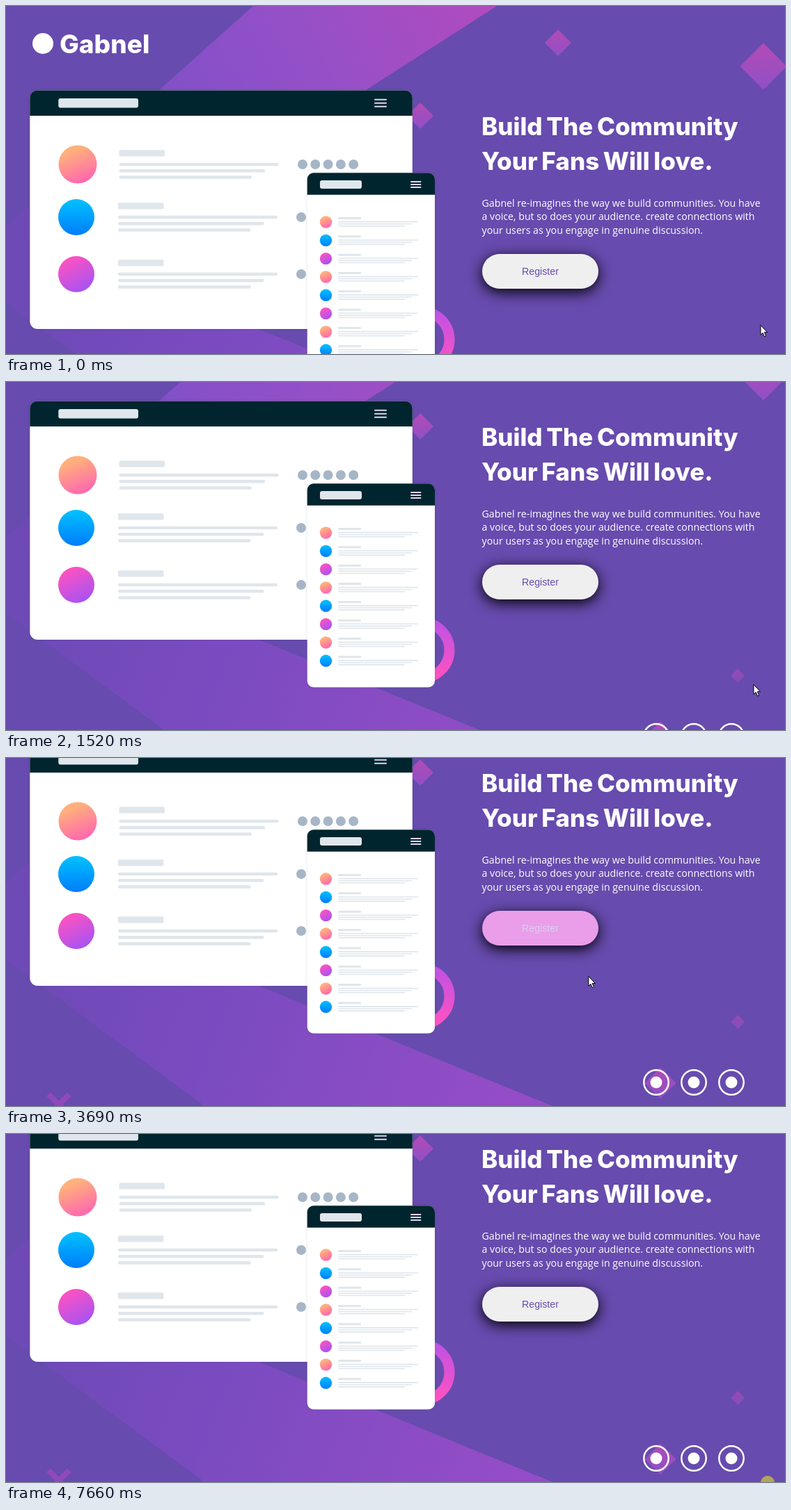
Animation of 1119 by 501 pixels, one loop 7860 ms. Source, as an HTML page:

```html
<!DOCTYPE html>
<html lang="en">
<head>
<meta charset="utf-8">
<title>Gabnel</title>
<style>
html, body { margin: 0; width: 100%; height: 100%; overflow: hidden; background: #674bae; }
svg { display: block; width: 1119px; height: 501px; }
text { fill: #fff; white-space: pre; }
.brand { font: 800 37px Inter, sans-serif; }
.title { font: 800 35px Inter, sans-serif; word-spacing: -2px; }
.copy { font: 14.2px "Open Sans", sans-serif; }
.label { font: 14.2px "Liberation Sans", Arial, sans-serif; text-anchor: middle; }
#shadow { filter: blur(10px); }
.card { filter: drop-shadow(0 0 1.5px rgba(0, 20, 40, .15)); }
#cursor path { fill: #fff; stroke: #000; stroke-linejoin: round; }
</style>
</head>
<body>
<svg viewBox="0 0 1119 501">
  <defs>
    <linearGradient id="upper" gradientUnits="userSpaceOnUse" x1="690" y1="0" x2="70" y2="330">
      <stop stop-color="#b04bbf"/><stop offset=".35" stop-color="#9650c7"/>
      <stop offset=".7" stop-color="#8050c8"/><stop offset="1" stop-color="#6f4ab7"/>
    </linearGradient>
    <linearGradient id="lower" gradientUnits="userSpaceOnUse" x1="30" y1="400" x2="720" y2="638">
      <stop stop-color="#6d4ab6"/><stop offset=".4" stop-color="#7a4bc0"/><stop offset="1" stop-color="#944dc6"/>
    </linearGradient>
    <linearGradient id="gem" x2="0" y2="1"><stop stop-color="#b74bb5"/><stop offset="1" stop-color="#9250c9"/></linearGradient>
    <linearGradient id="ring" x2="0" y2="1"><stop stop-color="#c052e4"/><stop offset="1" stop-color="#ff52c1"/></linearGradient>
    <linearGradient id="peach" x1=".3" x2=".7" y2="1"><stop offset=".15" stop-color="#ffb07c"/><stop offset=".9" stop-color="#ff6cab"/></linearGradient>
    <linearGradient id="sky" x2="0" y2="1"><stop stop-color="#00c2ff"/><stop offset="1" stop-color="#007dfb"/></linearGradient>
    <linearGradient id="pink" x1=".25" x2=".75" y2="1"><stop offset=".05" stop-color="#ff52c1"/><stop offset="1" stop-color="#a253f5"/></linearGradient>
  </defs>
  <g id="page">
    <path fill="url(#upper)" d="M355 0H705L34 432 0 427V318Z"/>
    <path fill="url(#lower)" d="M0 316 785 638H285L0 427Z"/>
    <g id="gems"></g>
    <path d="M61 621 91 651M91 621 61 651" stroke="#9049b9" stroke-width="8"/>
    <circle cx="597" cy="480" r="40" fill="none" stroke="url(#ring)" stroke-width="15"/>
    <g id="art"></g>
    <circle cx="53" cy="54" r="15" fill="#fff"/>
    <text class="brand" x="77" y="67.5">Gabnel</text>
    <text class="title" x="683" y="186">Build The Community</text>
    <text class="title" x="683" y="236">Your Fans Will love.</text>
    <text class="copy" x="683.5" y="289">Gabnel re-imagines the way we build communities. You have</text>
    <text class="copy" x="683.5" y="308.3">a voice, but so does your audience. create connections with</text>
    <text class="copy" x="683.5" y="327.6">your users as you engage in genuine discussion.</text>
    <rect id="shadow" x="684" y="362" width="167" height="50" rx="25"/>
    <rect id="button" x="684" y="357" width="167" height="50" rx="25"/>
    <text id="label" class="label" x="767.5" y="386.5">Register</text>
    <g id="icons"></g>
  </g>
  <circle id="click" r="10" fill="#ff0" opacity=".5"/>
  <g id="cursor">
    <path d="M0-.5V13.5L3.1 10.6 5.5 16 7.7 15 5.3 9.8H9.5Z"/>
    <path d="M-1.8 1.5Q0-.8 1.6 1.5V6.5L6.8 8Q8.6 8.6 8.4 11L7 16V19H-2V17L-6 11.5Q-6.3 9.4-4.4 9.8L-1.8 12Z"/>
  </g>
</svg>
<script>
const $ = id => document.getElementById(id);
const rect = (x, y, w, h, fill, r = 0) =>
  `<rect x="${x}" y="${y}" width="${w}" height="${h}" rx="${r}" fill="${fill}"/>`;
const disc = (x, y, r, fill) => `<circle cx="${x}" cy="${y}" r="${r}" fill="${fill}"/>`;
const gem = (x, y, r, opacity) =>
  `<path d="M${x} ${y - r}l${r} ${r} ${-r} ${r} ${-r} ${-r}Z" fill="url(#gem)" opacity="${opacity}"/>`;
const paints = ['peach', 'sky', 'pink'].map(id => `url(#${id})`);
const pale = '#dfe6ec', slate = '#a6b6c6';

function card(x, y, w, h, head, r) {
  return `<g class="card">${rect(x, y, w, h, '#fff', r)}<path fill="#00252e" d="M${x} ${y + head}V${y + r}` +
    `a${r} ${r} 0 0 1 ${r} ${-r}H${x + w - r}a${r} ${r} 0 0 1 ${r} ${r}V${y + head}Z"/></g>`;
}
function menu(x, y, w, gap) {
  return [-1, 0, 1].map(i => rect(x, y + i * gap - 1, w, 2, '#e2d5ee', 1)).join('');
}
function bigRow(y, r, x, i) {
  const lines = [229, 209.5, 190.5].map((w, k) => rect(x, y - 2.2 + k * 9.2, w, 4.5, pale, 2));
  return disc(i ? 101 : 103, y, r, paints[i]) + rect(x, y - 20.7, 65.5, 9.3, pale, 2) + lines.join('');
}
function smallRow(i) {
  const y = 311 + i * 26.33;
  const lines = [115, 106, 96].map((w, k) => rect(477, y - 1.2 + k * 3.1, w, 1.6, pale, .8));
  return disc(459.5, y, 8.7, paints[i % 3]) + rect(477, y - 7, 33, 3, pale, 1) + lines.join('');
}

$('gems').innerHTML = gem(793, 53, 19, .95) + gem(1088, 87, 33.5, .95) + gem(595, 158, 19, .95) +
  gem(1051, 517, 10, .6) + gem(940, 605, 22.5, .9);

$('art').innerHTML = card(34.3, 121.4, 549.5, 343.6, 36.6, 11) + rect(75.3, 133, 114.7, 13.5, pale, 3) +
  menu(529, 139.7, 18, 5) +
  bigRow(228, 27.5, 162.5, 0) + bigRow(304, 26, 161, 1) + bigRow(386, 26, 161, 2) +
  [0, 1, 2, 3, 4].map(i => disc(426 + i * 18.3, 228, 7, slate)).join('') +
  disc(424, 304, 7, slate) + disc(424, 386, 7, slate) +
  card(432.7, 240.3, 183.3, 293.2, 31.5, 9) + rect(451, 251, 60, 12, pale, 3) + menu(581, 257, 15.5, 4) +
  [...Array(8).keys()].map(smallRow).join('');

$('icons').innerHTML = [934, 988, 1042].map(x =>
  `<g><circle cx="${x}" cy="604" r="17.7" fill="none" stroke="currentColor" stroke-width="2.5"/>` +
  disc(x, 604, 8.5, 'currentColor') + '</g>').join('');

const LOOP = 7860;
// [start time, scroll offset], held until the next
const scrolls = [[0, 0], [910, 8], [980, 25], [1050, 33], [1450, 55], [1520, 94], [1590, 126], [1660, 137]];
// [start, end, x, y] of each pointer move
const moves = [
  [70, 70, 1074, 436], [2300, 2740, 804, 262], [3460, 4170, 936, 474],
  [4600, 5060, 990, 475], [5600, 6110, 1042, 472], [6960, 7330, 1062, 506]
];
// [enter, leave] while the pointer is over the button and each icon
const hovers = [[2650, 3600], [4040, 4780], [4890, 5800], [5940, 7080]];

const clamp = x => Math.min(1, Math.max(0, x));
const smooth = x => x * x * (3 - 2 * x);
const bezier = (a, b, s) => 3 * a * s * (1 - s) ** 2 + 3 * b * s * s * (1 - s) + s ** 3;

// CSS "ease" timing
function ease(x) {
  let lo = 0, hi = 1;
  for (let i = 0; i < 16; i++) {
    const mid = (lo + hi) / 2;
    if (bezier(.25, .25, mid) < x) lo = mid; else hi = mid;
  }
  return bezier(.1, 1, lo);
}
const fade = (t, [enter, leave]) => ease(clamp((t - enter) / 500)) - ease(clamp((t - leave) / 500));
const mix = (a, b, p) => `rgb(${a.map((v, i) => Math.round(v + (b[i] - v) * p))})`;
const white = [255, 255, 255], rose = [232, 130, 232];

function pointer(t) {
  let x = 1084, y = 460;
  for (const [start, end, toX, toY] of moves) {
    if (t < start) break;
    const p = end > start ? smooth(clamp((t - start) / (end - start))) : 1;
    x += (toX - x) * p;
    y += (toY - y) * p;
  }
  return [x, y];
}

function draw(t) {
  const scroll = scrolls.filter(s => s[0] <= t).pop()[1];
  $('page').setAttribute('transform', `translate(0 ${-scroll})`);

  const [onButton, ...onIcons] = hovers.map(h => fade(t, h));
  $('button').style.fill = mix([239, 239, 239], rose, onButton);
  $('label').style.fill = mix([103, 75, 174], white, onButton);
  onIcons.forEach((p, i) => $('icons').children[i].style.color = mix(white, rose, p));

  const [x, y] = pointer(t);
  const [arrow, hand] = $('cursor').children;
  const over = hovers.some(([enter, leave]) => t >= enter && t < leave);
  $('cursor').setAttribute('transform', `translate(${x} ${y})`);
  arrow.style.display = over ? 'none' : '';
  hand.style.display = over ? '' : 'none';

  const last = t >= 7660;
  $('click').setAttribute('transform', last ? 'translate(1094 502)' : 'translate(1072.5 436)');
  $('click').style.display = last || (t >= 500 && t < 710) ? '' : 'none';
}

const begin = performance.now();
function tick() {
  draw((performance.now() - begin) % LOOP);
  requestAnimationFrame(tick);
}
tick();
</script>
</body>
</html>
```
